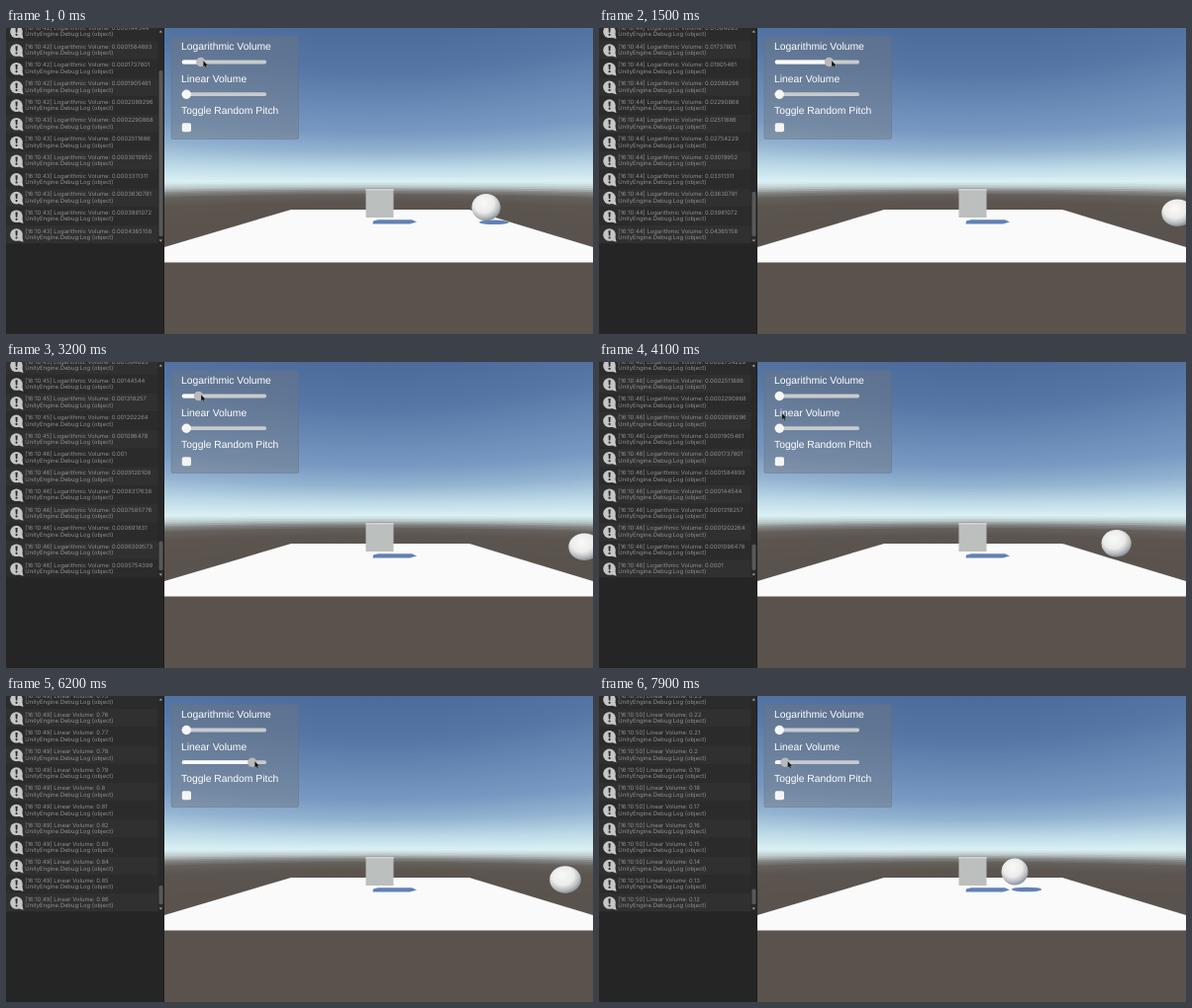
Animation of 593 by 310 pixels, one loop 8000 ms. Source, as an HTML page:

```html
<!DOCTYPE html>
<html lang="en">
<head>
<meta charset="utf-8">
<title>Volume sliders</title>
<style>
  html, body { margin: 0; width: 100%; height: 100%; overflow: hidden; background: #262626; }
  svg { display: block; width: 593px; height: 310px; }
  text { text-rendering: geometricPrecision; }
  .log text { font: 5.9px Inter, sans-serif; fill: #8f8f8f; }
  .panel text { font: 10.35px "Liberation Sans", Arial, sans-serif; fill: #fff; }
</style>
</head>
<body>
<svg viewBox="0 0 593 310">
  <defs>
    <radialGradient id="ball" cx=".42" cy=".34" r=".72">
      <stop offset="0" stop-color="#fafaf9"/>
      <stop offset=".5" stop-color="#ebebea"/>
      <stop offset=".75" stop-color="#b9bcbe"/>
      <stop offset="1" stop-color="#707c8c"/>
    </radialGradient>
    <clipPath id="floor"><path d="M288 184H468L593 222V237.500H160V222Z"/></clipPath>
    <clipPath id="view"><rect x="160" width="433" height="310"/></clipPath>
    <clipPath id="list"><rect width="160" height="218.500"/></clipPath>
    <g id="note">
      <circle cx="10.500" cy="209.500" r="6.300" fill="#c6c6c6"/>
      <path d="M12 215L17.500 216.800L16 210Z" fill="#c6c6c6"/>
      <path d="M9.500 205.300h2.200l-.4 5.200h-1.400z" fill="#2b2b2b"/>
      <circle cx="10.600" cy="212.500" r="1.100" fill="#2b2b2b"/>
    </g>
  </defs>

  <g clip-path="url(#view)">
    <g id="sky"></g>
    <path d="M288 184H468L593 222V237.500H160V222Z" fill="#f9faf9"/>
    <path d="M371 195.500L376 194.200H410L415 196.500L408 198.500H370.500Z" fill="#6281b6"/>
    <g clip-path="url(#floor)"><ellipse id="shade" rx="15" ry="2.300" fill="#6281b6"/></g>
    <rect x="363.500" y="163" width="28" height="29" fill="#bbbfbd"/>
    <rect x="363.500" y="163" width="28" height="1.600" fill="#d2d5d2"/>
    <ellipse id="sphere" fill="url(#ball)"/>
  </g>

  <g class="panel">
    <rect x="167" y="8.500" width="128.500" height="104" rx="1.500" fill="#70767f" fill-opacity=".45" stroke="#5f6f88" stroke-opacity=".5" stroke-width=".8"/>
    <text x="177" y="22.300">Logarithmic Volume</text>
    <text x="177" y="54.800">Linear Volume</text>
    <text x="177" y="87.300">Toggle Random Pitch</text>
    <g id="sliders"></g>
    <rect x="177.800" y="96.300" width="9.200" height="9" rx="1.800" fill="#f4f4f4"/>
    <path id="cursor" d="M0 0V6.800L1.600 5.400L2.700 7.800L3.900 7.300L2.900 5H5Z" fill="#111" stroke="#ddd" stroke-width=".3"/>
  </g>

  <rect width="160" height="310" fill="#252525"/>
  <g id="rows" class="log" clip-path="url(#list)"></g>
  <rect x="153.500" width="6" height="218.500" fill="#292929"/>
  <rect id="thumb" x="154.500" width="4" rx="1.500" fill="#585858"/>
  <path d="M154.600 4.500L156.300 2.500L158 4.500ZM154.600 214.500L156.300 216.500L158 214.500Z" fill="#aaa"/>
  <rect x="159" width="1" height="310" fill="#1d1d1d"/>
</svg>

<script>
const LOOP = 8000, STEP = 100, PITCH = 18.7, ROWS = 12;
const $ = id => document.getElementById(id);

// Slider positions: [seconds, value 0..1]
const logKeys = [[-.35, 0], [-.1, .084], [-.06, .104], [-.059, .116], [0, .163], [.7, .433],
  [.8, .51], [1.25, .66], [1.85, .66], [2.2, .53], [2.9, .257], [3.2, .19], [3.65, 0]];
const linKeys = [[4.5, 0], [4.9, .104], [5, .152], [6.2, .862], [6.43, 1], [6.52, 1],
  [7.9, .12], [7.94, .03]];
// Sphere x over one strike, and the cursor's trip between the sliders
const strikeTime = 1.005;
const strikeKeys = [[0, 406], [.03, 420], [.145, 474], [.17, 485], [.34, 565], [.355, 584.5],
  [.87, 584.5], [strikeTime, 406]];
const tripKeys = [[3.7, 33], [4.4, 66]];
// Sky colours: [pixels below the horizon at mid-view, r, g, b]
const skyStops = [[-155, 75, 107, 155], [-110, 86, 119, 166], [-50, 120, 153, 194],
  [-30, 148, 180, 209], [-14, 186, 216, 230], [0, 219, 241, 244], [5, 186, 200, 202],
  [9, 132, 133, 131], [13, 101, 96, 92], [20, 92, 85, 79], [40, 90, 83, 77]];

function along(keys, t, n = 1) {
  if (t <= keys[0][0]) return keys[0][n];
  for (let i = 1; i < keys.length; i++) {
    const a = keys[i - 1], b = keys[i];
    if (t <= b[0]) return a[n] + (b[n] - a[n]) * (t - a[0]) / (b[0] - a[0]);
  }
  return keys[keys.length - 1][n];
}

function set(el, attrs) {
  for (const name in attrs) el.setAttribute(name, attrs[name]);
}

// Lines of equal elevation bend away from the horizon towards the sides
let bands = "";
for (let v = -155; v <= 40; v += 1.5) {
  const edge = 155 + v * 1.28, middle = 155 + v * .72;
  const rgb = [1, 2, 3].map(n => Math.round(along(skyStops, v, n)));
  bands += `<path d="M160 ${edge}Q376.5 ${middle} 593 ${edge}V310H160Z" fill="rgb(${rgb})"/>`;
}
$("sky").innerHTML = bands;

// Every change of a slider by a hundredth writes one log line
function record(label, keys, format) {
  const out = [];
  let last = 0;
  for (let ms = -350; ms < LOOP; ms++) {
    const n = Math.round(along(keys, ms / 1000) * 100);
    if (n === last) continue;
    last = n;
    const clock = 42 + Math.floor((ms + 1100) / 1000);
    out.push({ ms, text: `[16:10:${clock}] ${label} Volume: ${format(n / 100)}` });
  }
  return out;
}
const lines = [
  ...record("Logarithmic", logKeys, v => +(10 ** (4 * v - 4)).toPrecision(7)),
  ...record("Linear", linKeys, v => v)
];

$("rows").innerHTML = Array.from({ length: ROWS }, (_, k) =>
  `<g transform="translate(0 ${-k * PITCH})">
    <rect y="199.800" width="154" height="${PITCH}"/>
    <use href="#note"/>
    <text x="19.300" y="207.700"></text>
    <text x="19.300" y="214.200">UnityEngine.Debug:Log (object)</text>
  </g>`).join("");
const rows = [...$("rows").children].map(g => ({
  back: g.querySelector("rect"), text: g.querySelector("text")
}));

$("sliders").innerHTML = [34.5, 67.2].map(y =>
  `<g>
    <rect x="177.800" y="${y - 1.9}" width="85.200" height="3.800" rx="1.700" fill="#c8cacc"/>
    <rect x="177.800" y="${y - 1.9}" height="3.800" rx="1.700" fill="#fafafa"/>
    <circle cy="${y}" r="4.700"/>
  </g>`).join("");
const sliders = [...$("sliders").children];

function drawSlider(g, value, held) {
  const x = 182.3 + value * 76;
  set(g.children[1], { width: x - 177.8 });
  set(g.children[2], { cx: x, fill: held ? "#b9babb" : "#f6f6f6" });
  return x;
}

function drawLog(ms) {
  const count = lines.filter(l => l.ms <= ms).length;
  rows.forEach(({ back, text }, k) => {
    const i = count - 1 - k;
    text.textContent = lines[i] ? lines[i].text : "";
    set(back, { fill: i % 2 ? "#2b2b2b" : "#303030" });
  });
  const size = 8 + 2400 / count;
  set($("thumb"), { y: 211 - size, height: size });
}

function drawSphere(t) {
  const x = along(strikeKeys, (t + .17) % strikeTime), d = x - 420;
  set($("sphere"), { cx: x, cy: 178 + d * .056, rx: 13.5 + d * .016, ry: 13.5 + d * .002 });
  set($("shade"), { cx: x + 12 - d * .06, cy: 196 + d * .012 });
}

function draw(ms) {
  const t = ms / 1000;
  // The handles run slightly ahead of the log
  const first = drawSlider(sliders[0], along(logKeys, t + .07), t < 3.7);
  const second = drawSlider(sliders[1], along(linKeys, t + .02), t > 4.4);
  const x = (t < 4 ? first : second) + 2.5;
  set($("cursor"), { transform: `translate(${x} ${along(tripKeys, t)})` });
  drawLog(ms);
  drawSphere(t);
}

const start = performance.now();
function tick() {
  const ms = (performance.now() - start) % LOOP;
  draw(Math.floor(ms / STEP) * STEP);
  requestAnimationFrame(tick);
}
tick();
</script>
</body>
</html>
```
